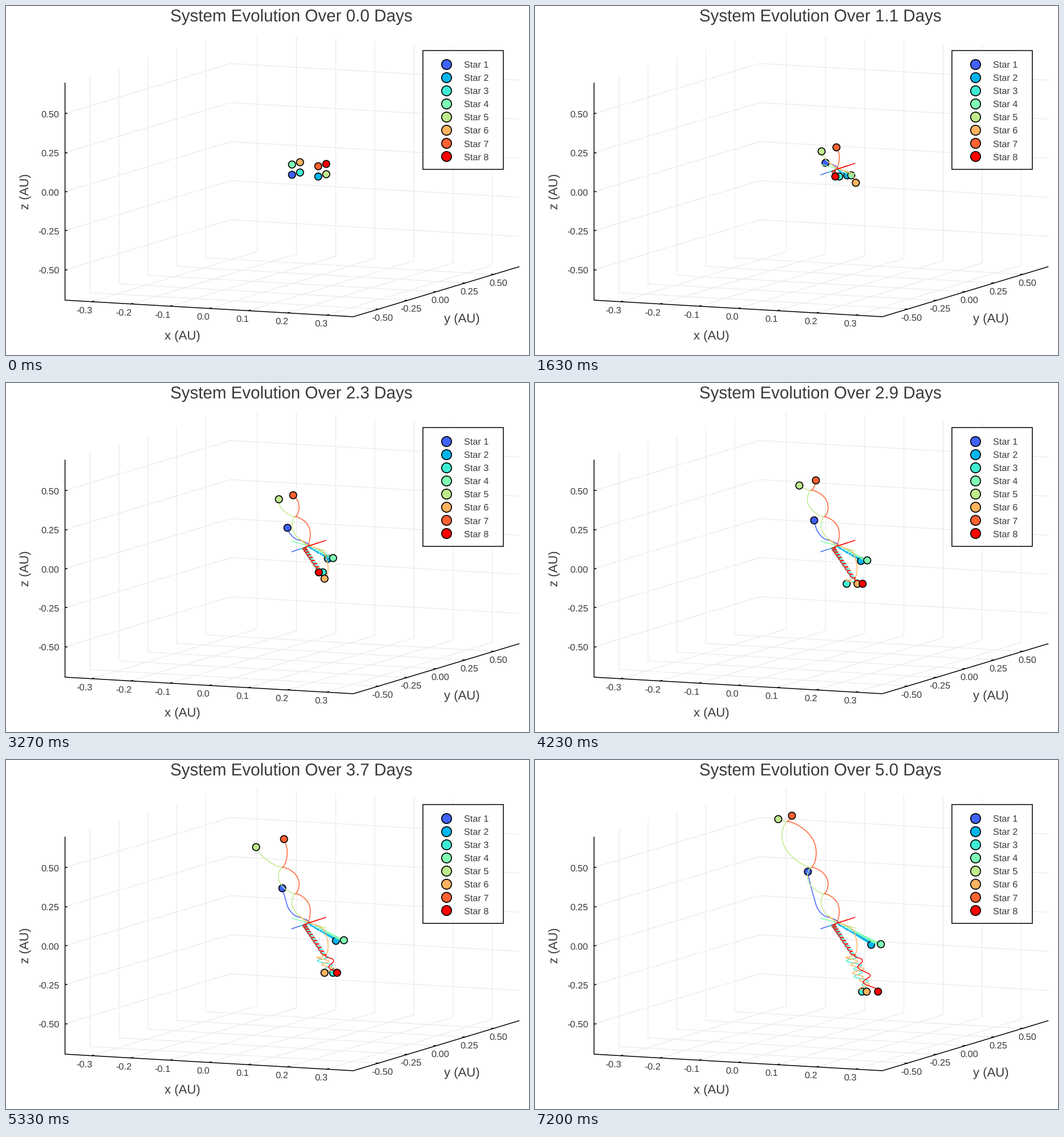
A matplotlib script for the animation above (7230 ms loop, 917 by 611 pixels).

```python
import numpy as np
import matplotlib.pyplot as plt
from matplotlib.animation import FuncAnimation
from matplotlib.collections import LineCollection
from matplotlib.patches import Rectangle

W, H, DPI = 917, 611, 100
PX = 72 / DPI                      # points per pixel
FRAMES, LOOP, DAYS = 217, 7230, 5.0
SUB = 8                            # trail samples per frame
INK = "#3a3a3a"
COLORS = ["#4062fa", "#00b5eb", "#40ecd4", "#80ffb4",
          "#bfeb8d", "#ffb360", "#ff6232", "#ff0000"]

plt.rcParams.update({"font.family": "Liberation Sans", "text.hinting": "none"})
fig = plt.figure(figsize=(W / 100, H / 100), dpi=DPI, facecolor="white")
ax = fig.add_axes([0, 0, 1, 1])
ax.set(xlim=(0, W), ylim=(H, 0))
ax.axis("off")


# ---------- box, grid and labels ----------
O = np.array([103.5, 515.0])
X, Y, Z = np.array([505.5, 29.0]), np.array([290.5, -87.5]), np.array([0, -380.0])


def at(u, v, w):
    return O + u * X + v * Y + w * Z


def label(x, y, s, size, ha="center", **kw):
    """Text whose capitals are centred on y."""
    return ax.text(x, y + 0.344 * size, s, fontsize=size * PX, color=INK,
                   ha=ha, va="baseline", **kw)


def segments(lines, color, width, z):
    ax.add_collection(LineCollection(lines, colors=color, linewidths=width * PX,
                                     zorder=z, capstyle="projecting"))


grid, ticks = [], []
for i in range(-3, 4):
    u = 0.5 + i * 68.7 / 505.5
    grid.append([at(u, 0, 0), at(u, 1, 0), at(u, 1, 1)])
    p = at(u, 0, 0)
    ticks.append([p, p + 0.012 * Y])
    label(p[0] + 1.3, p[1] + 14.2, f"{i / 10:.1f}", 16.4, "right")
for i in range(-2, 3):
    v = 0.5 + i * 50.6 / 290.5
    w = 0.5 + i * 68.4 / 380
    grid.append([at(1, v, 0), at(0, v, 0), at(0, v, 1)])
    grid.append([at(0, 0, w), at(0, 1, w), at(1, 1, w)])
    p, q = at(1, v, 0), at(0, 0, w)
    ticks += [[p, p - 0.008 * X], [q, q + (3, 0)]]
    s = f"{i / 4:.2f}"
    label(p[0] - (12 if i < 0 else 8.5), p[1] + 14.2, s, 16.4, "left")
    label(93.5, q[1] + 0.8, s, 16.4, "right")

segments(grid, "#e6e6e6", 1, 0)
segments([[at(0, 0, 1), at(0, 0, 0), at(1, 0, 0), at(1, 1, 0)]] + ticks, "black", 1.5, 1)

label(309.5, 577, "x (AU)", 22.2)
label(799.3, 547, "y (AU)", 22.2)
ax.text(40.5, 325, "z (AU)", fontsize=22.2 * PX, color=INK, rotation=90,
        rotation_mode="anchor", ha="center", va="baseline")
title = label(500, 17, "", 29.5)


def dot(color, r, z):
    return ax.plot([], [], "o", ms=2 * r * PX, mfc=color, mec="black",
                   mew=1.7 * PX, zorder=z, snap=False)[0]


ax.add_patch(Rectangle((731, 78), 140.5, 208, fc="white", ec="black",
                       lw=1.5 * PX, zorder=30))
for i, c in enumerate(COLORS):
    y = 101.5 + 23.13 * i
    dot(c, 8.7, 31).set_data([772], [y])
    label(803, y + 0.5, f"Star {i + 1}", 16.3, "left", zorder=31)


# ---------- orbits ----------
T = np.arange((FRAMES - 1) * SUB + 1) / SUB
CENTER = np.array([531, 285.5])


def ramp(a, b):
    """Smooth step from 0 at time a to 1 at time b."""
    s = np.clip((T - a) / (b - a), 0, 1)[:, None]
    return s * s * (3 - 2 * s)


def blend(p, q, a, b):
    return p + (q - p) * ramp(a, b)


def along(vx, vy, amount):
    return np.outer(amount, (vx, vy))


def cosine(peak, period):
    return np.cos(2 * np.pi * (T - peak) / period)


def fall(x, y):
    """Free fall from rest to the middle of the cluster."""
    left = (1 - np.minimum(T / 23, 1) ** 2) ** (2 / 3)
    return CENTER + along(x - CENTER[0], y - CENTER[1], left)


def drift(start, end, t0, t1, power):
    """Path of a centre of mass, slowing down (power < 1) or speeding up."""
    s = np.maximum((T - t0) / (t1 - t0), 0)[:, None] ** np.array(power)
    return np.array(start) + s * np.subtract(end, start)


def bounce(turns):
    """Distance of two bodies on a radial orbit that meet at the given times."""
    t = np.array(turns, float)
    i = np.clip(np.searchsorted(t, T, "right") - 1, 0, len(t) - 2)
    period = t[i + 1] - t[i]
    s = np.clip((T - t[i]) / period, 0, 1)
    return (period * np.abs(np.sin(np.pi * s))) ** (2 / 3)


def curve(*keys):
    """Smooth path through a few (time, x, y) points."""
    k = np.array(keys, float)
    t, p = k[:, 0], k[:, 1:]
    m = np.gradient(p, t, axis=0)
    i = np.clip(np.searchsorted(t, T, "right") - 1, 0, len(t) - 2)
    h = (t[i + 1] - t[i])[:, None]
    s = np.clip((T - t[i])[:, None] / h, 0, 1)
    return ((1 + 2 * s) * (1 - s) ** 2 * p[i] + s * (1 - s) ** 2 * h * m[i]
            + s * s * (3 - 2 * s) * p[i + 1] + s * s * (s - 1) * h * m[i + 1])


# star 1 is thrown out alone
lone = curve((22, 534, 283), (29, 525, 279), (50, 508, 273), (71, 499, 265),
             (127, 489, 240), (216, 477.5, 195))

# stars 5 and 7 leave upwards on an ever wider orbit
upper = drift((529, 284), (438, 100), 24, 216, (0.9, 0.82))
swing = along(1.18, -0.33, bounce((24, 63, 111, 206, 290)))

# stars 2 and 4 leave to the right with many close passes
right = drift((531, 285.5), (597.5, 322.5), 24, 216, 0.6)
beat = along(0.5, -0.05, bounce(np.arange(23.5, 240, 11)) / 11 ** (2 / 3) * (7 + 0.046 * T))

# stars 3 and 8 circle tightly until star 6 joins them
tight = drift((523, 289), (560, 344), 26, 114, 1.3)
spin = 1.2 + 2 * np.pi * (T - 29) / 8.3
circle = np.column_stack([3.6 * np.cos(spin), -1.3 * np.sin(spin)])
outer = curve((22, 531, 284), (29, 548.5, 291), (50, 562.5, 311),
              (71, 564.5, 330), (92, 561, 340), (112, 549, 347))

# the three of them drift down: star 8 swings wide around the inner two
lower = drift((562, 352), (585, 405), 127, 216, 1) + along(0.258, 0.596, np.minimum(T - 127, 0))
wide = along(1, 0, 6.5 + 0.05 * T * cosine(124, 44))
inner = along(1, 0, (0.05 * (T - 127) - 10) * cosine(127, 23))

later = [
    lone,
    right - beat,
    blend(tight - circle, lower - wide / 2 + inner, 108, 116),
    right + beat,
    upper - swing,
    blend(outer, lower - wide / 2 - inner, 108, 118),
    upper + swing,
    blend(tight + circle, lower + wide, 108, 122),
]

# eight stars start on the corners of a small cube
starts = [CENTER + 23 * np.array([a, 0.055 * a]) + b * np.array([6.8, -2]) + c * np.array([0, -9.2])
          for a, b, c in [(-1, -1, -1), (1, -1, -1), (-1, 1, -1), (-1, -1, 1),
                          (1, 1, -1), (-1, 1, 1), (1, -1, 1), (1, 1, 1)]]
paths = [blend(fall(*s), path, 18, 28) for s, path in zip(starts, later)]

trails = [ax.plot([], [], color=c, lw=1.5 * PX, zorder=5 + 2 * i,
                  solid_joinstyle="round")[0] for i, c in enumerate(COLORS)]
stars = [dot(c, 6.2, 6 + 2 * i) for i, c in enumerate(COLORS)]


def update(n):
    end = n * SUB + 1
    for path, trail, star in zip(paths, trails, stars):
        trail.set_data(path[:end, 0], path[:end, 1])
        star.set_data(path[end - 1:end, 0], path[end - 1:end, 1])
    title.set_text(f"System Evolution Over {DAYS * n / (FRAMES - 1):.1f} Days")
    return trails + stars + [title]


anim = FuncAnimation(fig, update, frames=FRAMES, interval=LOOP / FRAMES,
                     init_func=lambda: update(0), repeat=True, repeat_delay=0)
plt.show()
```
